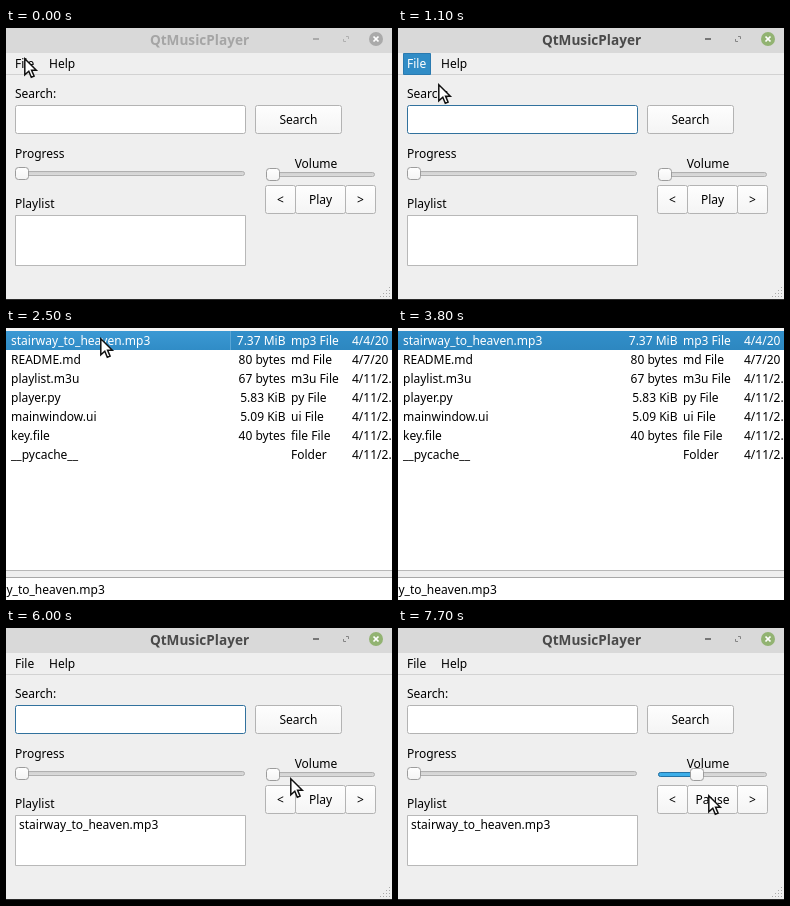
Write an HTML page with a canvas that moves like this. It is 386 px wide and 272 px high and loops after 8000 ms.

```html
<!DOCTYPE html>
<html lang="en">
<head>
<meta charset="utf-8">
<title>Music player</title>
<style>
html, body { margin: 0; width: 100%; height: 100%; overflow: hidden; background: #efefef; }
canvas { display: block; width: 386px; height: 272px; }
</style>
</head>
<body>
<canvas id="stage" width="386" height="272"></canvas>
<script>
const ctx = document.getElementById('stage').getContext('2d', { alpha: false });
const LOOP = 8000, STEP = 100;
const BLUE = '#308cc6', SONG = 'stairway_to_heaven.mp3';
const FONT = '12px "Noto Sans", sans-serif';

// Pointer paths: [time, x, y], straight between keys.
const paths = [
  [[0, 18, 30], [200, 18, 30], [700, 40, 56], [2000, 40, 56], [2300, 94, 10],
   [2800, 94, 10], [2900, 140, 48], [3000, 234, 142]],
  [[4600, 0, 139], [4700, 10, 106], [4900, 42, 52], [5100, 95, 36], [5300, 153, 54],
   [5600, 240, 122], [5800, 291, 177], [6000, 284, 150], [6200, 267, 149],
   [6800, 298, 149], [7100, 298, 149], [7500, 310, 167], [8000, 310, 167]]
];

const files = [
  [SONG, '7.37 MiB', 'mp3 File', '4/4/20'],
  ['README.md', '80 bytes', 'md File', '4/7/20'],
  ['playlist.m3u', '67 bytes', 'm3u File', '4/11/2.'],
  ['player.py', '5.83 KiB', 'py File', '4/11/2.'],
  ['mainwindow.ui', '5.09 KiB', 'ui File', '4/11/2.'],
  ['key.file', '40 bytes', 'file File', '4/11/2.'],
  ['__pycache__', '', 'Folder', '4/11/2.']
];

function pointerAt(t) {
  for (const path of paths) {
    for (let i = 1; i < path.length; i++) {
      const [t0, x0, y0] = path[i - 1], [t1, x1, y1] = path[i];
      if (t < t0 || t > t1) continue;
      const k = (t - t0) / (t1 - t0);
      return { x: Math.round(x0 + (x1 - x0) * k), y: Math.round(y0 + (y1 - y0) * k) };
    }
  }
  return null;
}

function fill(x, y, w, h, color) {
  ctx.fillStyle = color;
  ctx.fillRect(x, y, w, h);
}

function text(str, x, y, color = '#000', align = 'left', font = FONT) {
  ctx.font = font;
  ctx.textAlign = align;
  ctx.fillStyle = color;
  ctx.fillText(str, x, y);
}

function shade(y, h, top, bottom) {
  const g = ctx.createLinearGradient(0, y, 0, y + h);
  g.addColorStop(0, top);
  g.addColorStop(1, bottom);
  return g;
}

function box(x, y, w, h, color, border, radius = 0) {
  ctx.beginPath();
  ctx.roundRect(x + .5, y + .5, w - 1, h - 1, radius);
  ctx.fillStyle = color;
  ctx.fill();
  ctx.lineWidth = 1;
  ctx.strokeStyle = border;
  ctx.stroke();
}

function line(points, color, width) {
  ctx.beginPath();
  points.forEach(([x, y]) => ctx.lineTo(x, y));
  ctx.strokeStyle = color;
  ctx.lineWidth = width;
  ctx.stroke();
}

function button(label, x, w) {
  const y = label === 'Search' ? 77 : 157;
  box(x, y, w, 29, shade(y, 29, '#fefefe', '#f4f4f4'), '#b3b3b3', 2);
  text(label, x + w / 2, y + 19, '#000', 'center');
}

function slider(x, y, w, offset) {
  box(x, y, w, 5, shade(y, 5, '#cfcfcf', '#dedede'), '#b0b0b0', 2);
  if (offset > 0) box(x, y, offset + 6, 5, '#3daee9', '#2573a6', 2);
  box(x + offset, y - 4, 14, 13, shade(y - 4, 13, '#fff', '#f3f3f3'), '#9c9c9c', 3);
}

function titleBar(active) {
  const ink = active ? '#4a4a4a' : '#a5a5a5';
  fill(0, 0, 386, 25, '#d9d9d9');
  text('QtMusicPlayer', 193.5, 17, ink, 'center', 'bold 13.6px "Noto Sans", sans-serif');
  fill(307, 10, 6, 2, active ? '#777' : '#aaa');
  const mark = active ? '#858585' : '#b0b0b0';
  line([[340, 8.5], [342.5, 8.5], [342.5, 11]], mark, 1);
  line([[337.5, 11], [337.5, 13.5], [340, 13.5]], mark, 1);
  ctx.beginPath();
  ctx.arc(370, 11, 7, 0, Math.PI * 2);
  ctx.fillStyle = active ? '#92b372' : '#aaa';
  ctx.fill();
  line([[367.5, 8.5], [372.5, 13.5]], '#fff', 1.7);
  line([[372.5, 8.5], [367.5, 13.5]], '#fff', 1.7);
}

function fileMenu() {
  box(4, 47, 139, 102, '#f7f7f7', '#a8a8a8');
  fill(6, 49, 135, 24, BLUE);
  ['Open', 'Save', 'Close', 'Quit'].forEach((label, i) =>
    text(label, 30, 65 + i * 25, i ? '#000' : '#fff'));
}

function player(t) {
  const active = t >= 300 && t !== 3900;
  const menuLit = t >= 300 && t < 1400;
  const focused = active && t < 6300;
  const caret = (t >= 4000 && t < 4500) || (t >= 5100 && t < 5700);

  fill(0, 0, 386, 272, '#efefef');
  titleBar(active);
  fill(0, 46, 386, 1, '#d2d2d2');
  if (menuLit) box(5, 25, 28, 22, BLUE, '#2a7ab0');
  text('File', 9, 40, menuLit ? '#fff' : '#000');
  text('Help', 43, 40);

  text('Search:', 9, 70);
  box(9, 77, 231, 29, '#fff', focused ? '#31719d' : '#b3b3b3', 2);
  if (caret) fill(13, 84, 1, 16, '#000');
  button('Search', 249, 87);

  text('Progress', 9, 130);
  slider(9, 143, 230, 0);
  text('Volume', 310, 140, '#000', 'center');
  const volume = t < 6200 ? 0 : Math.min(32, Math.max(0, pointerAt(t).x - 266));
  slider(260, 144, 109, volume);

  button('<', 259, 31);
  button('>', 339, 31);
  button(t >= 7700 ? 'Pause' : 'Play', 289, 51);

  text('Playlist', 9, 180);
  box(9, 187, 231, 51, '#fff', '#b8b8b8');
  if (t >= 4000) text(SONG, 13, 201);

  for (let row = 0; row < 4; row++)
    for (let col = 0; col <= row; col++)
      fill(383 - col * 3, 259 + row * 3, 1, 1, '#aaa');
  fill(0, 271, 386, 1, '#2b2b2b');
  if (t >= 300 && t < 1100) fileMenu();
}

function fileDialog(t) {
  const selected = t >= 2500;
  fill(0, 0, 386, 272, '#fff');
  fill(0, 0, 386, 3, '#f5f5f5');
  if (selected) {
    fill(0, 3, 386, 19, shade(3, 19, '#328fca', '#2d87c0'));
    if (t < 3800) {
      fill(0, 3, 224, 19, shade(3, 19, '#3b99d4', '#308cc6'));
      fill(224, 3, 1, 19, '#5aa6d6');
    }
  }
  files.forEach(([name, size, type, date], i) => {
    const y = 17 + i * 19, color = selected && i === 0 ? '#fff' : '#000';
    text(name, 5, y, color);
    text(size, 279.5, y, color, 'right');
    text(type, 285, y, color);
    text(date, 346, y, color);
  });
  fill(0, 242, 386, 8, '#efefef');
  fill(0, 242, 386, 1, '#b8b8b8');
  fill(0, 249, 386, 1, '#a8a8a8');
  if (selected) text(SONG.slice(7), .5, 266);
}

function pointer({ x, y }) {
  ctx.beginPath();
  [[0, 0], [0, 16], [4, 12.5], [6.5, 18.5], [9.3, 17.3], [6.8, 11.5], [11.5, 11.5]]
    .forEach(([dx, dy]) => ctx.lineTo(x + .8 + dx, y + .8 + dy));
  ctx.closePath();
  ctx.fillStyle = '#fff';
  ctx.fill();
  ctx.lineWidth = 1.5;
  ctx.strokeStyle = '#111';
  ctx.stroke();
}

function draw(now) {
  const t = Math.floor((now % LOOP) / STEP) * STEP;
  if (t >= 1400 && t < 3900) fileDialog(t);
  else player(t);
  const tip = pointerAt(t);
  if (tip) pointer(tip);
}

const start = performance.now();
function tick() {
  draw(performance.now() - start);
  requestAnimationFrame(tick);
}
tick();
</script>
</body>
</html>
```
